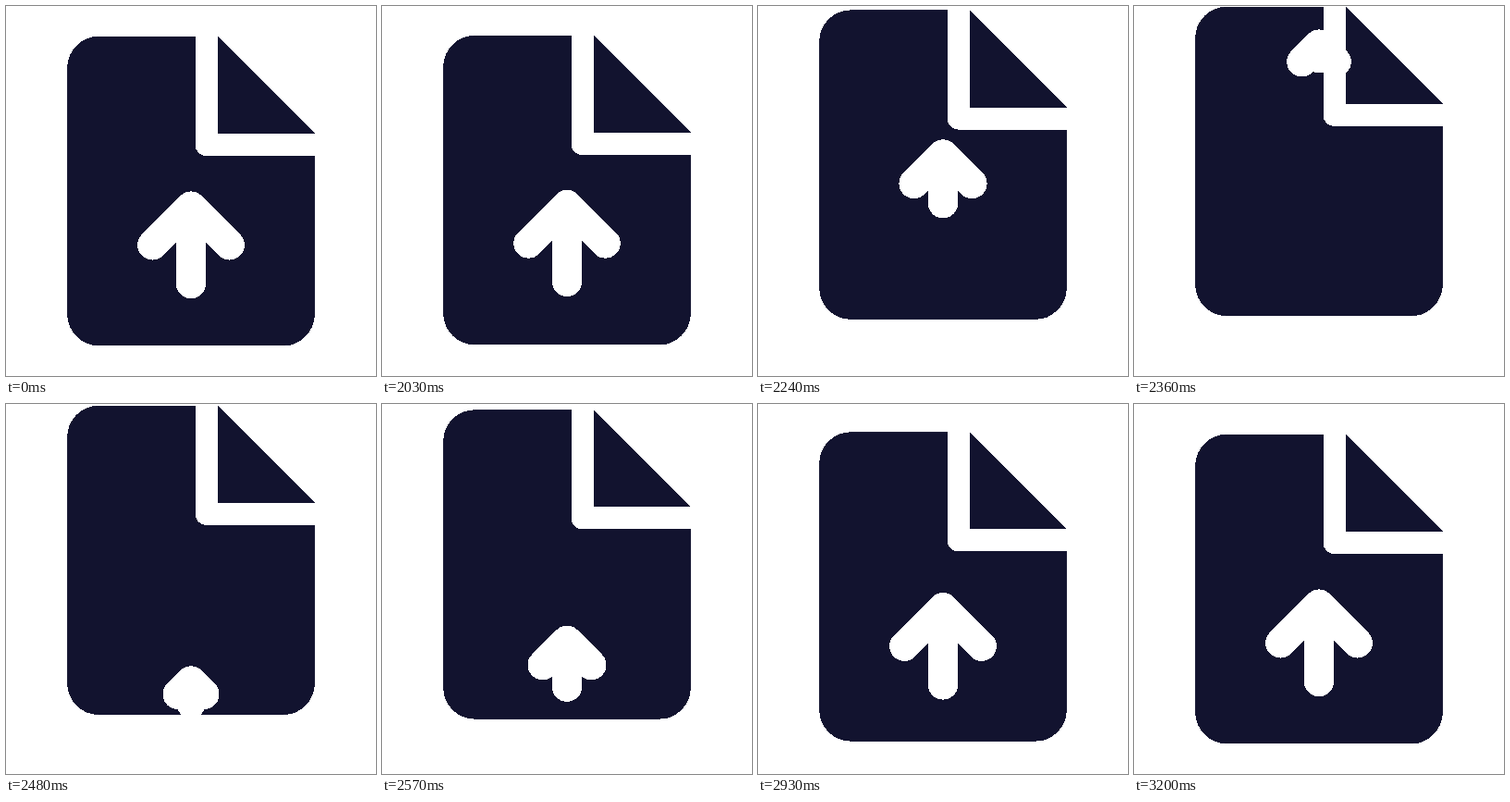
These frames come from a looping animation (400x400 px, 3.23 s). An HTML page:

```html
<!DOCTYPE html>
<html lang="en">
<head>
<meta charset="utf-8">
<title>File upload</title>
<style>
  html, body { margin: 0; height: 100%; overflow: hidden; background: #fff; }
  svg { display: block; width: 100%; height: 100%; }
</style>
</head>
<body>
<!-- Hard pixel edges: dark shapes grow by half a pixel, white lines shrink by as much -->
<svg viewBox="0 0 24 24" shape-rendering="crispEdges">
  <g id="page">
    <path fill="#12132f" stroke="#12132f" stroke-width=".056" d="M6 2H13.75L20 8.25V20a2 2 0 0 1-2 2H6a2 2 0 0 1-2-2V4a2 2 0 0 1 2-2z"/>
    <g fill="none" stroke="#fff" stroke-linejoin="round">
      <path stroke-width="1.444" d="M13 1V9H21"/>
      <path id="arrow" stroke-width="1.944" stroke-linecap="round"/>
    </g>
  </g>
</svg>
<script>
const LOOP = 3230, START = 2000, PEAK = 2390, END = 3200, STEP = 30;
const LIFT = 1.932;
const page = document.getElementById('page');
const arrow = document.getElementById('arrow');

const clamp = v => Math.min(1, Math.max(0, v));
const progress = (t, from, to) => clamp((t - from) / (to - from));
const smooth = u => u * u * (3 - 2 * u);

// Cubic Bézier easing, solved by bisection
function bezier(x1, y1, x2, y2) {
  const at = (s, a, b) => 3 * (1 - s) ** 2 * s * a + 3 * (1 - s) * s * s * b + s ** 3;
  return x => {
    if (x <= 0 || x >= 1) return clamp(x);
    let low = 0, high = 1;
    for (let i = 0; i < 24; i++) {
      const mid = (low + high) / 2;
      if (at(mid, x1, x2) < x) low = mid; else high = mid;
    }
    return at(low, y1, y2);
  };
}

const rise = bezier(.28, 0, .25, 1);
const settle = bezier(.4, 0, .2, 1);
const enter = bezier(.2, .55, .2, 1);

// Arrow pose: vertical shift within the page, wing and shaft lengths
function arrowPose(t) {
  if (t < PEAK) {
    const u = progress(t, START, PEAK);
    return [-.6 * u - 11.5 * u ** 4.5, 2.5 * (1 - .65 * u * u), 5 * (1 - .97 * u * u)];
  }
  const small = 1 - smooth(progress(t, PEAK, PEAK + 345));
  return [10.32 * (1 - enter(progress(t, PEAK, END))), 2.5 * (1 - .79 * small), 5 * (1 - .86 * small)];
}

function draw(now) {
  const t = START + Math.floor((now % LOOP - START) / STEP) * STEP;
  const lift = t < PEAK ? rise(progress(t, START, PEAK)) : 1 - settle(progress(t, PEAK, END));
  page.setAttribute('transform', `translate(0 ${-LIFT * lift})`);

  const [shift, wing, shaft] = arrowPose(t);
  const tip = 13 + shift;
  arrow.setAttribute('d',
    `M${12 - wing} ${tip + wing}L12 ${tip}L${12 + wing} ${tip + wing}M12 ${tip}V${tip + shaft}`);
}

const origin = performance.now();
function tick() {
  draw(performance.now() - origin);
  requestAnimationFrame(tick);
}
tick();
</script>
</body>
</html>
```
